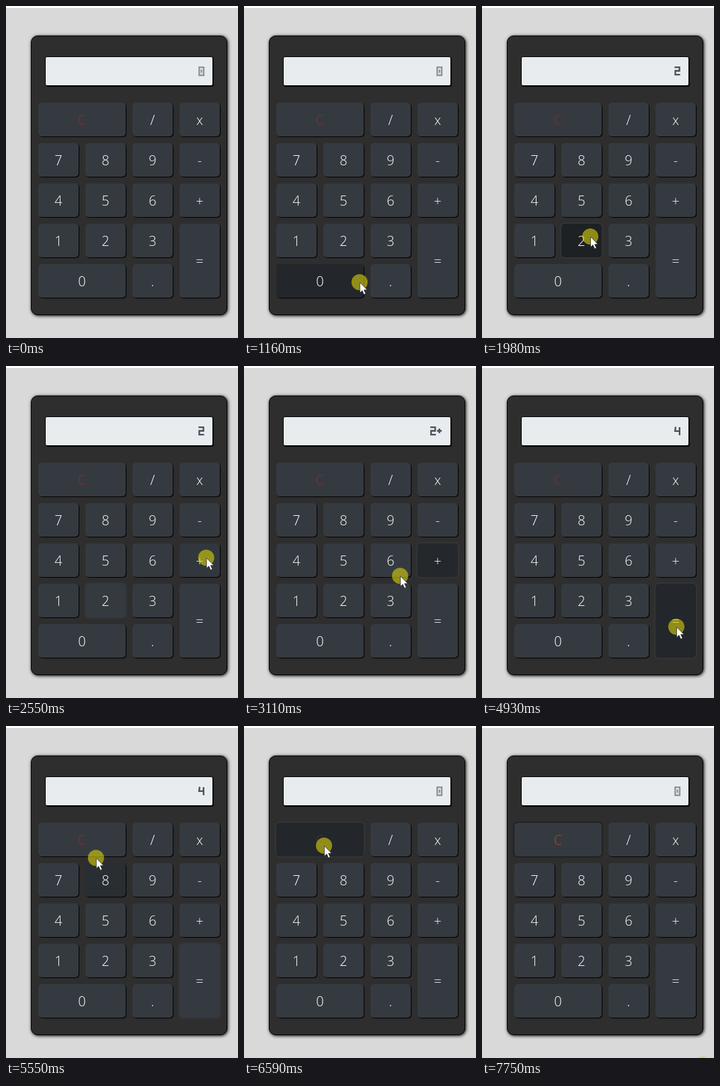
An HTML page that plays this animation: 345x494 px, repeating every 7.82 s.

```html
<!DOCTYPE html>
<html lang="en">
<head>
<meta charset="utf-8">
<title>Calculator</title>
<style>
  html, body { margin: 0; width: 100%; height: 100%; overflow: hidden; }
  body { position: relative; background: #d9d9d9; }
  body::before { content: ""; position: absolute; width: 100%; height: 3px; background: #fff; }
  #calc, #screen, .key, svg { position: absolute; box-sizing: border-box; }
  #calc {
    left: 37px; top: 44px; width: 292px; height: 416px;
    background: #2e2e2e; border: 1px solid #000; border-radius: 10px;
    box-shadow: 1px 1px 5px #000;
  }
  #screen {
    left: 58px; top: 75px; width: 250px; height: 44px;
    background: #e8ecef; border: 1px solid #000; border-radius: 3px;
    box-shadow: 1px 1px 1px #000;
  }
  .key {
    display: flex; align-items: center; justify-content: center;
    padding-top: 2px; border-radius: 5px; color: #fff;
    font: 350 20px/30px "Open Sans", "Noto Sans", sans-serif;
  }
  svg { left: 0; top: 0; width: 345px; height: 494px; }
  #digits { fill: none; stroke-width: 2.3; }
</style>
</head>
<body>
<div id="calc"></div>
<div id="screen"></div>
<svg>
  <g id="digits"></g>
  <g id="pointer">
    <circle r="12" fill="#dcd20a" fill-opacity=".6"/>
    <path d="M.5 .5V15.8L4 12.5 6.6 18.3 9.2 17.2 6.6 11.5H11.4Z" fill="#fff" stroke="#222" stroke-width=".7"/>
  </g>
</svg>
<script>
const LOOP = 7820, HOLD = 230, TRAIL = 15;
const $ = id => document.getElementById(id);
const smooth = u => u * u * (3 - 2 * u);
const mix = (a, b, u) => `rgb(${a.map((v, i) => v + (b[i] - v) * u)})`;

// A repeated label is one key spanning those cells.
const layout = 'CC/x' + '789-' + '456+' + '123=' + '00.=';
const keys = [...new Set(layout)].map(label => {
  const first = layout.indexOf(label), last = layout.lastIndexOf(label);
  const x = 48 + first % 4 * 70, y = 144 + (first >> 2) * 60;
  const w = (last % 4 - first % 4) * 70 + 60, h = ((last >> 2) - (first >> 2)) * 60 + 50;
  const el = document.createElement('div');
  el.className = 'key';
  el.textContent = label;
  el.style.cssText = `left:${x}px;top:${y}px;width:${w}px;height:${h}px`;
  document.body.insertBefore(el, document.querySelector('svg'));
  return { label, el, hit: p => p.x >= x && p.x < x + w && p.y >= y && p.y < y + h };
});

// Pointer stops; a stop with a key presses it halfway through the stay.
const stops = [
  { arrive: 340, leave: 340, x: 296, y: 508 },
  { arrive: 900, leave: 1130, x: 172, y: 412 },
  { arrive: 1580, leave: 2090, x: 161, y: 343, key: '2' },
  { arrive: 2400, leave: 2400, x: 330, y: 303 },
  { arrive: 2610, leave: 2930, x: 290, y: 281, key: '+' },
  { arrive: 3330, leave: 3960, x: 155, y: 354, key: '2' },
  { arrive: 4290, leave: 5060, x: 289, y: 388, key: '=' },
  { arrive: 5660, leave: 6590, x: 119, y: 178, key: 'C' },
  { arrive: 7010, leave: 7320, x: 236, y: 456 },
  { arrive: LOOP, leave: LOOP, x: 333, y: 506 }
];
const presses = stops.filter(s => s.key).map(s => ({ key: s.key, at: (s.arrive + s.leave) / 2 }));

function pointerAt(t) {
  const i = stops.findIndex(s => s.arrive > t);
  if (i < 1) return stops[0];
  const a = stops[i - 1], b = stops[i];
  const u = smooth(Math.max(0, (t - a.leave) / (b.arrive - a.leave)));
  return { x: a.x + (b.x - a.x) * u, y: a.y + (b.y - a.y) * u };
}

function enter(text, key) {
  if (key === 'C') return '0';
  if (key === '=') return String(text.split('+').reduce((sum, n) => sum + Number(n), 0));
  return text === '0' ? key : text + key;
}

const glyphs = {
  0: 'M1.3 1.2H8V13H1.3ZM4.65 4.5V9.5',
  2: 'M.3 1.2H7.6V6.5H1.4V12.2H8.6',
  4: 'M2 .5L1.1 6.8H8M7.8 1V13',
  '+': 'M4.5 3V10M1 6.5H8'
};

function drawDigits(text) {
  $('digits').setAttribute('stroke', text === '0' ? '#8a9499' : '#4a4f54');
  $('digits').innerHTML = [...text].map((c, i) =>
    `<path d="${glyphs[c]}" transform="translate(${286 - 9.3 * (text.length - 1 - i)} 90)"/>`
  ).join('');
}

function draw(t) {
  const done = presses.filter(p => p.at <= t);
  const last = done[done.length - 1];
  const trail = Array.from({ length: TRAIL }, (_, i) => pointerAt(t - 40 - i * 10));
  drawDigits(done.reduce((text, p) => enter(text, p.key), '0'));

  for (const { label, el, hit } of keys) {
    const hover = smooth(trail.filter(hit).length / TRAIL);
    const focused = last && label === last.key;
    const lit = focused && t >= 7340;
    el.style.background = focused && t - last.at < HOLD
      ? '#1d2124' : mix([52, 58, 64], [35, 39, 43], hover);
    el.style.boxShadow = lit ? '0 0 2px 1px #181818'
      : focused ? '0 0 0 2px rgba(82,88,93,.15)' : '1px 1px 1px #000';
    if (label === 'C') el.style.color = lit ? '#b5481a' : mix([132, 46, 48], [60, 54, 56], hover);
  }
  const { x, y } = pointerAt(t);
  $('pointer').setAttribute('transform', `translate(${x} ${y})`);
}

function tick(now) {
  draw(now % LOOP);
  requestAnimationFrame(tick);
}
draw(0);
requestAnimationFrame(tick);
</script>
</body>
</html>
```
